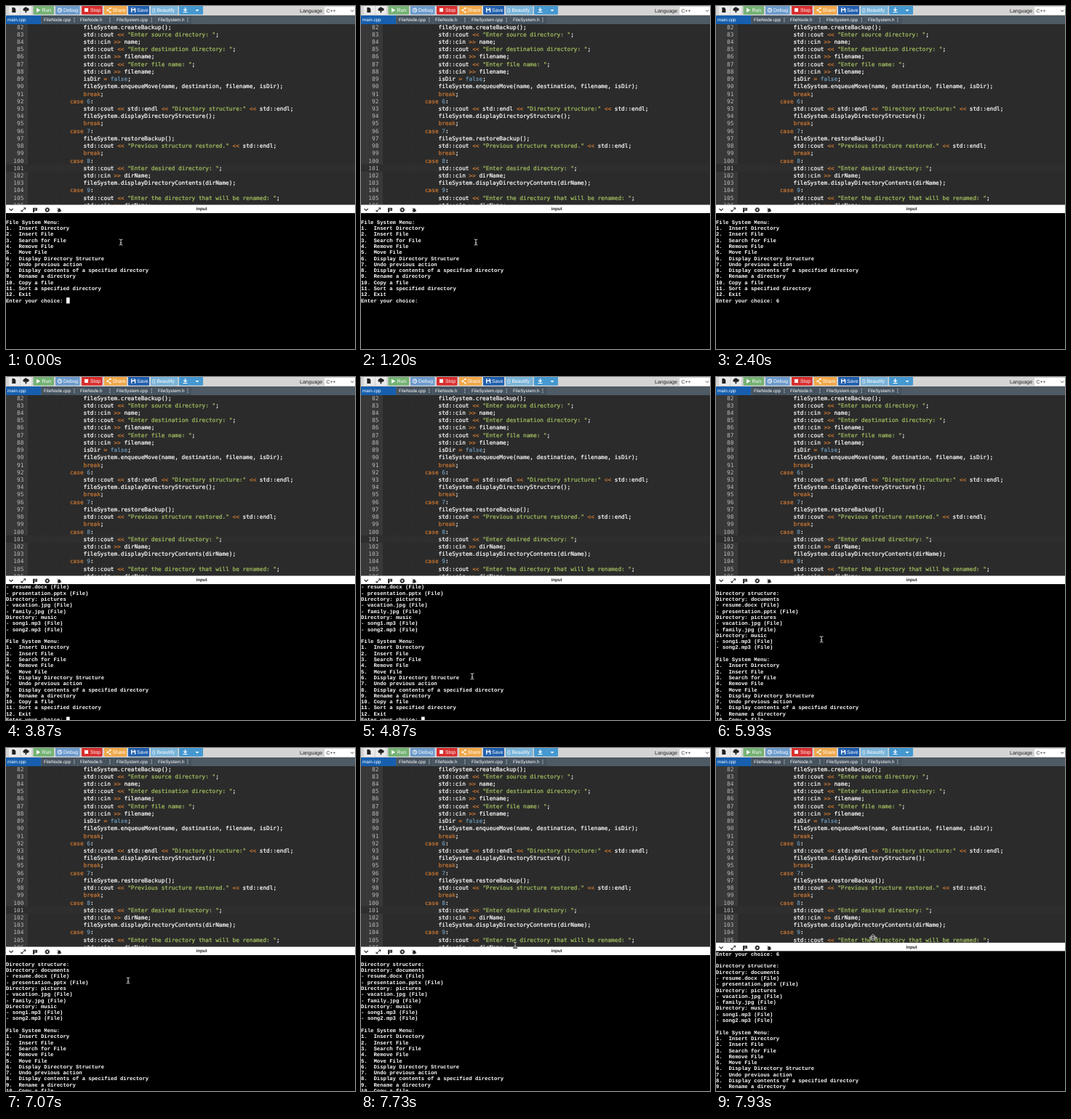
Animation, 480 px wide and 472 px high, one loop 8000 ms. Source, as an HTML page:

```html
<!DOCTYPE html>
<html lang="en">
<head>
<meta charset="utf-8">
<title>Code editor with console</title>
<style>
html, body { margin: 0; width: 100%; height: 100%; overflow: hidden; background: #000; }
svg { display: block; width: 480px; height: 472px; }
text { white-space: pre; text-rendering: geometricPrecision; font-family: "Liberation Sans", sans-serif; }
.code text { font: 7.74px "DejaVu Sans Mono", monospace; color: #fff; }
.code text, .code tspan { fill: currentColor; stroke: currentColor; stroke-width: .22px; }
.code .number { color: #bcbcbc; stroke: none; text-anchor: end; }
.code .str { color: #a5c261; }
.code .key { color: #cc7833; }
.code .const { color: #6c99bb; }
.console text { font: bold 7.28px "Liberation Mono", monospace; fill: #fff; }
.button { font-size: 6.8px; fill: #fff; }
.tab { font-size: 6.3px; fill: #fff; }
</style>
</head>
<body>
<svg viewBox="0 0 480 472">
  <defs>
    <clipPath id="consoleClip"><rect y="285" width="480" height="200"/></clipPath>
  </defs>
  <g id="editor" class="code"></g>
  <g id="header"></g>
  <g id="panel">
    <rect y="273.5" width="480" height="210"/>
    <rect y="273.5" width="480" height="11.5" fill="#fff"/>
    <g fill="none" stroke="#222" stroke-width="1.2">
      <path d="M4.5 278.9l2.6 2.6 2.6-2.6"/>
      <path d="M21.3 282.6l5.2-4.6M24.3 277.9h2.4v2.2M21 280.6v2.2h2.4" stroke-width="1"/>
      <circle cx="56.8" cy="280.5" r="2" stroke-width="1.6"/>
      <circle cx="56.8" cy="280.5" r="3" stroke-dasharray="1.2 1.16" stroke-width="1"/>
      <path d="M70.3 278l5.6 5M70.3 281.4h5.8M70.8 284l4.5-3.6" stroke-width=".8"/>
    </g>
    <path d="M37 277.7h6v4h-4v2.3h-2z" fill="#222"/>
    <path d="M38.6 278.9h3M38.6 280.4h3" stroke="#fff" stroke-width=".5"/>
    <ellipse cx="73.2" cy="281" rx="1.9" ry="2.7" fill="#222"/>
    <text x="261.5" y="281.2" font-size="6.2" font-weight="bold" fill="#222">input</text>
    <g id="console" class="console" clip-path="url(#consoleClip)">
      <rect id="block" width="4.6" height="8.2" fill="#fff"/>
    </g>
  </g>
  <g id="ibeam" fill="none" stroke-linecap="round">
    <path d="M-2-4q2 0 2 1.2q0-1.2 2-1.2M0-3V3M-2 4q2 0 2-1.2q0 1.2 2 1.2M-1 .9h2" stroke="#000" stroke-width="2"/>
    <path d="M-2-4q2 0 2 1.2q0-1.2 2-1.2M0-3V3M-2 4q2 0 2-1.2q0 1.2 2 1.2M-1 .9h2" stroke="#ddd" stroke-width=".9"/>
  </g>
  <path id="resize" d="M0-4.6l2.4 2.5h-1.5v1.3h3.5v1.6h-3.5v1.3h1.5L0 4.6l-2.4-2.5h1.5v-1.3h-3.5v-1.6h3.5v-1.3h-1.5z" fill="#111" stroke="#fff" stroke-width=".8"/>
</svg>
<script>
const $ = id => document.getElementById(id);
const escapeXml = s => s.replace(/&/g, '&amp;').replace(/</g, '&lt;').replace(/>/g, '&gt;');
const rect = (x, y, w, h, fill, extra = '') =>
  `<rect x="${x}" y="${y}" width="${w}" height="${h}" fill="${fill}" ${extra}/>`;
const label = (x, y, str, cls = '', extra = '') =>
  `<text x="${x}" y="${y}" class="${cls}" ${extra}>${str}</text>`;

// Editor
const CODE_X = 32, CHAR = 4.66, CODE_LINE = 10.22, FIRST_LINE = 82;
const source = `
fileSystem.createBackup();
std::cout << "Enter source directory: ";
std::cin >> name;
std::cout << "Enter destination directory: ";
std::cin >> filename;
std::cout << "Enter file name: ";
std::cin >> filename;
isDir = false;
fileSystem.enqueueMove(name, destination, filename, isDir);
break;
case 6:
std::cout << std::endl << "Directory structure:" << std::endl;
fileSystem.displayDirectoryStructure();
break;
case 7:
fileSystem.restoreBackup();
std::cout << "Previous structure restored." << std::endl;
break;
case 8:
std::cout << "Enter desired directory: ";
std::cin >> dirName;
fileSystem.displayDirectoryContents(dirName);
case 9:
std::cout << "Enter the directory that will be renamed: ";
std::cin >> dirName;`.trim().split('\n');

function highlight(line) {
  const token = /("[^"]*")|(\bcase\b|\bbreak\b|<<|>>|=)|(\bfalse\b|\b\d+\b)/g;
  let html = '', last = 0;
  for (const m of line.matchAll(token)) {
    const cls = m[1] ? 'str' : m[2] ? 'key' : 'const';
    html += escapeXml(line.slice(last, m.index)) + `<tspan class="${cls}">${escapeXml(m[0])}</tspan>`;
    last = m.index + m[0].length;
  }
  return html + escapeXml(line.slice(last));
}

function drawEditor() {
  let html = rect(0, 25, 480, 250, '#2b2b2b') + rect(0, 25, 30, 250, '#383838') +
    rect(0, 217.8, 480, CODE_LINE, '#2e2e2e');
  source.forEach((line, i) => {
    const y = 31.6 + i * CODE_LINE;
    const indent = line.startsWith('case') ? 12 : 16;
    for (let col = 4; col < indent; col += 4)
      html += rect(CODE_X + col * CHAR, y - 7.5, .5, CODE_LINE, '#323232');
    html += label(24.3, y, FIRST_LINE + i, 'number') +
      label(CODE_X + indent * CHAR, y, highlight(line));
  });
  $('editor').innerHTML = html;
}

// Toolbar and file tabs
const TAB_Y = 13, TAB_H = 12;

function drawHeader() {
  const button = (x, w, fill, textX, str = '') =>
    rect(x, -1, w, 12.8, fill, 'rx="1.3"') + label(textX, 8.2, str, 'button');
  const dots = x => [16.2, 18.5, 20.8].map(y => rect(x, y, 1, 1, '#fff')).join('');
  const tab = (x, w, str, dotX) =>
    rect(x, TAB_Y, w, TAB_H, '#46535f') + label(x + 2.5, 20.9, str, 'tab') + dots(dotX);

  $('header').innerHTML =
    rect(0, 0, 480, TAB_Y, '#d4d4d4') + rect(0, TAB_Y, 480, TAB_H, '#4e5a64') +
    button(4, 15, '#eaeaea', 0) + button(20, 15, '#eaeaea', 0) +
    button(37.5, 28.5, '#75b375', 49.5, 'Run') +
    button(68, 33.5, '#6c9bcd', 79, 'Debug') +
    button(104, 28.5, '#d92f2f', 116, 'Stop') +
    button(135, 31, '#f0a849', 146.5, 'Share') +
    button(168, 29, '#205fae', 180, 'Save') +
    button(199, 37.5, '#79b4d9', 201, '{} Beautify') +
    button(238, 33, '#4598d0', 0) +
    `<path d="M8.3 2h3l2 2v5h-5z" fill="#222"/>
     <path d="M25 6.8a1.9 1.9 0 0 1-.3-3.7a2.7 2.7 0 0 1 4.8-.3a2 2 0 0 1 .4 4h-1.6v2.4h-1.8v-2.4z" fill="#222"/>
     <path d="M42 2.7l5.2 3-5.2 3z M108 3h5v5h-5z" fill="#fff"/>
     <g fill="none" stroke="#fff">
       <circle cx="74" cy="5.7" r="2.7"/><path d="M74 3.8v2.2h1.6" stroke-width=".8"/>
       <path d="M143.5 3l-4 2.7 4 2.7"/>
       <path d="M246.5 2v4.3M244.3 4.5l2.2 2.2 2.2-2.2M243.5 8.5h6" stroke-width="1.1"/>
     </g>
     <path d="M142.5 2h2v2h-2z M138.5 4.7h2v2h-2z M142.5 7.4h2v2h-2z M260.5 5h5l-2.5 2.5z" fill="#fff"/>
     <path d="M172 2.5h5l1.3 1.3v5h-6.3z" fill="#fff"/>
     <path d="M173.3 2.5h3v2h-3z M173.3 6h3.7v2.8h-3.7z" fill="#205fae"/>` +
    label(404, 9.3, 'Language', '', 'font-size="7" fill="#222"') +
    rect(437.5, .8, 45, 11.6, '#fff', 'rx="1.5" stroke="#bbb" stroke-width=".6"') +
    label(440.5, 9.1, 'C++', '', 'font-size="6.8" fill="#333"') +
    '<path d="M474.2 5.6l2 2 2-2" fill="none" stroke="#333" stroke-width=".9"/>' +
    rect(0, TAB_Y, 48, TAB_H, '#175fae') + label(2, 20.9, 'main.cpp', 'tab') +
    tab(49.5, 48.5, 'FileNode.cpp', 93.4) + tab(99.5, 48, 'FileNode.h', 142.4) +
    tab(149.5, 55, 'FileSystem.cpp', 199.7) + tab(206.5, 49, 'FileSystem.h', 249.4);
}

// Console
const ROW = 8.3, TOP = 285, CELL = 4.37, ROWS = 24;
const prompt = 'Enter your choice: ';
const menu = ['', 'File System Menu:',
  ...['Insert Directory', 'Insert File', 'Search for File', 'Remove File', 'Move File',
    'Display Directory Structure', 'Undo previous action',
    'Display contents of a specified directory', 'Rename a directory', 'Copy a file',
    'Sort a specified directory', 'Exit'].map((item, i) => `${i + 1}.`.padEnd(4) + item)];
const listing = ['', 'Directory structure:',
  'Directory: documents', '- resume.docx (File)', '- presentation.pptx (File)',
  'Directory: pictures', '- vacation.jpg (File)', '- family.jpg (File)',
  'Directory: music', '- song1.mp3 (File)', '- song2.mp3 (File)'];

const TYPED = 1900, ENTERED = 2530, MOUSE_BACK = 4300, DRAG = 7865, DRAGGED = 7925, LOOP = 8000;
const SCROLLS = [5480, 5560, 5640];

const rows = Array.from({ length: ROWS }, (_, i) => {
  const row = document.createElementNS('http://www.w3.org/2000/svg', 'text');
  row.setAttribute('x', 0);
  row.setAttribute('y', TOP + 6.4 + i * ROW);
  return $('console').appendChild(row);
});

function drawConsole(t) {
  const lines = [...menu, prompt + (t >= TYPED ? '6' : '')];
  let top = 0;
  if (t >= ENTERED) {
    lines.push(...listing, ...menu, prompt);
    top = 18 - SCROLLS.filter(s => t >= s).length - (t >= DRAGGED);
  }
  rows.forEach((row, i) => {
    const line = lines[top + i] || '';
    if (row.textContent !== line) row.textContent = line;
  });
  const blinkOn = (t + 430) % 1000 < 500;
  $('block').setAttribute('x', lines.at(-1).length * CELL);
  $('block').setAttribute('y', TOP + (lines.length - 1 - top) * ROW);
  $('block').style.display = blinkOn ? '' : 'none';
  const shift = t >= DRAGGED ? -5.6 : t >= DRAG ? -2 : 0;
  $('panel').setAttribute('transform', `translate(0 ${shift})`);
}

// Pointer: time, x, y
const path = [[0, 158, 325], [4300, 158, 406], [4600, 153, 412], [5000, 153, 412],
  [5400, 145, 361], [6350, 145, 361], [6850, 168, 320], [7350, 168, 320],
  [7800, 215, 268], [7865, 216, 266], [7925, 216, 261]];

function pointerAt(t) {
  const next = path.findIndex(p => p[0] > t);
  if (next < 0) return path.at(-1).slice(1);
  const [t0, x0, y0] = path[next - 1], [t1, x1, y1] = path[next];
  const u = (t - t0) / (t1 - t0), e = u * u * (3 - 2 * u);
  return [x0 + (x1 - x0) * e, y0 + (y1 - y0) * e];
}

function drawPointer(t) {
  const [x, y] = t < TYPED ? path[0].slice(1) : pointerAt(t);
  const visible = t < TYPED || t >= MOUSE_BACK;
  const resizing = t >= 7780;
  for (const [id, on] of [['ibeam', visible && !resizing], ['resize', resizing]]) {
    $(id).style.display = on ? '' : 'none';
    $(id).setAttribute('transform', `translate(${x} ${y})`);
  }
}

const start = performance.now();
function frame() {
  const t = (performance.now() - start) % LOOP;
  drawConsole(t);
  drawPointer(t);
  requestAnimationFrame(frame);
}
drawEditor();
drawHeader();
frame();
</script>
</body>
</html>
```
